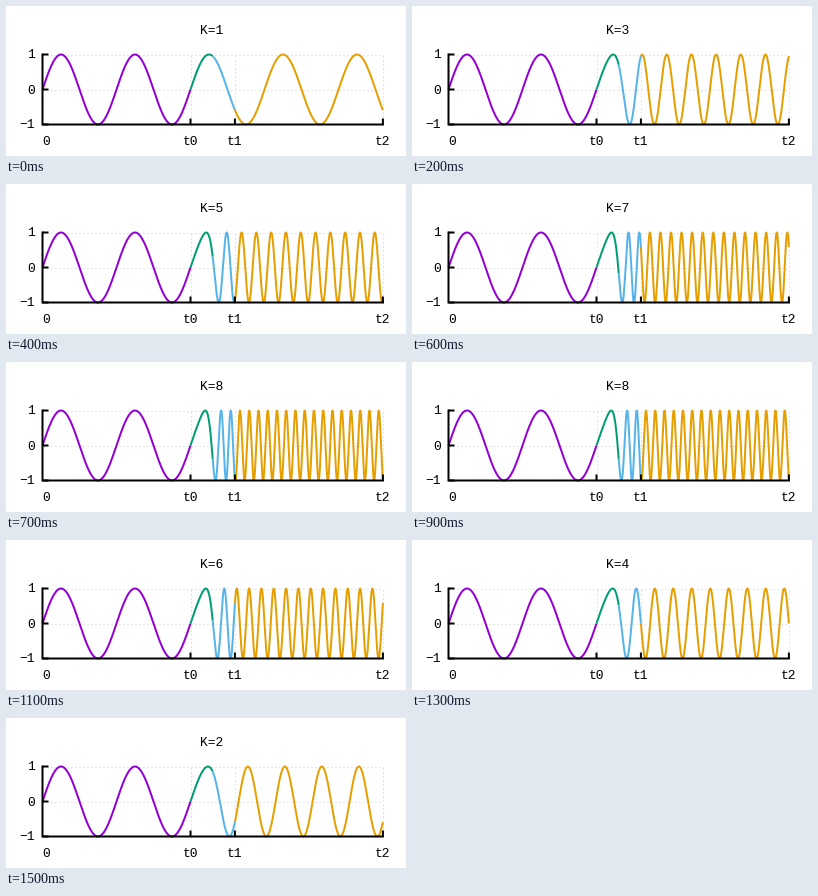
Animation of 400x150 px, one loop 1600 ms. Source, as a matplotlib script:

```python
import numpy as np
import matplotlib.pyplot as plt
from matplotlib.animation import FuncAnimation

W, H, DPI = 400, 150, 100
PX = 72 / DPI                      # one pixel in points

LEFT, MID, AMP = 36.5, 83.5, 35    # plot origin and wave height in pixels
PERIOD = 74                        # pixels per cycle at the base frequency
T0, T1, T2 = 2.0, 2.6, 4.6         # times in base cycles
RAMP = T1 - T0
HALF = T0 + RAMP / 2

plt.rcParams["font.family"] = "Liberation Mono"
plt.rcParams["font.size"] = 13 * PX

fig = plt.figure(figsize=(W / DPI, H / DPI), dpi=DPI, facecolor="white")
ax = fig.add_axes([0, 0, 1, 1])
ax.set_xlim(0, W)
ax.set_ylim(H, 0)
ax.axis("off")


def px(t):
    return LEFT + PERIOD * t


def phase(t, k):
    """Cycles elapsed while the frequency eases (cubic in-out) from 1 to k."""
    u = np.clip((t - T0) / RAMP, 0, 1)
    eased = np.where(u < 0.5, u**4, u - 0.5 + (1 - u)**4)
    return t + (k - 1) * (RAMP * eased + np.maximum(t - T1, 0))


def wave(t, k):
    return MID - AMP * np.sin(2 * np.pi * phase(t, k))


def grid(xs, ys):
    ax.plot(xs, ys, color="#cccccc", lw=PX, dashes=(1, 3),
            dash_capstyle="butt", snap=True, zorder=1)


def stroke(xs, ys):
    ax.plot(xs, ys, color="black", lw=2 * PX, snap=False,
            solid_capstyle="butt", solid_joinstyle="miter", zorder=3)


def label(x, y, text, ha="center"):
    return ax.text(x, y, text, ha=ha, va="baseline", color="black")


top, bottom, right = MID - AMP, MID + AMP, px(T2)

for y, text in ((top, "1"), (MID, "0"), (bottom, "\u22121")):
    if y < bottom:
        grid([LEFT, right], [y, y])
    stroke([LEFT, LEFT + 6], [y, y])
    label(29, y + 4, text, "right")

for t, text in ((T0, "t0"), (T1, "t1"), (T2, "t2")):
    grid([px(t)] * 2, [bottom, top])
    stroke([px(t)] * 2, [bottom, bottom - 6])
    label(px(t), 139, text)
label(40.5, 139, "0")

stroke([LEFT, LEFT, right + 1], [top - 1, bottom, bottom])
title = label(206, 28, "")

curves = []
for start, end, color in ((0, T0, "#9400d3"), (T0, HALF, "#009e73"),
                          (HALF, T1, "#56b4e9"), (T1, T2, "#e69f00")):
    t = np.linspace(start, end, 800)
    line, = ax.plot(px(t), wave(t, 1), color=color, lw=2 * PX,
                    solid_capstyle="butt", zorder=2)
    curves.append((t, line))


def update(i):
    k = 9 - abs(8 - i)
    title.set_text(f"K={k}")
    for t, line in curves:
        line.set_ydata(wave(t, k))
    return [title] + [line for _, line in curves]


anim = FuncAnimation(fig, update, frames=16, interval=100, repeat=True,
                     repeat_delay=0)
plt.show()
```
